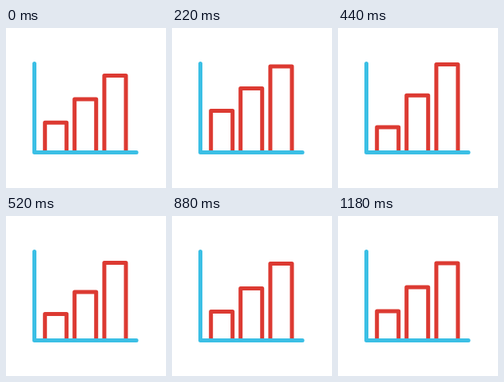
Recreate the animation shown at these times as an HTML page. Size 200x200 px, loop 1200 ms.

```html
<!DOCTYPE html>
<html lang="en">
<head>
<meta charset="utf-8">
<title>Bar chart</title>
<style>
  html, body { margin: 0; width: 100%; height: 100%; overflow: hidden; background: #fff; }
  svg { display: block; width: 100%; height: 100%; }
  path { fill: none; stroke-width: 5; stroke-linejoin: round; }
  .bar { stroke: #dc3a32; }
  .axis { stroke: #3bbfe5; stroke-linecap: round; }
</style>
</head>
<body>
<svg viewBox="0 0 200 200">
  <path class="bar"/>
  <path class="bar"/>
  <path class="bar"/>
  <path class="axis" d="M35.5 44.5V155.5H163"/>
</svg>
<script>
const LOOP = 1200, STAGGER = 67, PEAK = 223, LAND = 390, HALF_SWING = 180;
const bars = [
  { left: 48.7, right: 75.7, top: 118.5, lift: 15 },
  { left: 85.7, right: 112.7, top: 89, lift: 14 },
  { left: 122.9, right: 149.9, top: 59.5, lift: 15 }
];
const paths = document.querySelectorAll('.bar');

// Eased rise, accelerating fall, then a decaying swing around rest.
function offset(t, lift) {
  if (t <= 0) return 0;
  if (t < PEAK) return -lift * (1 - (1 - t / PEAK) ** 3);
  if (t < LAND) return -lift * (1 - ((t - PEAK) / (LAND - PEAK)) ** 4);
  const s = (t - LAND) / HALF_SWING;
  return 8.6 * Math.sin(Math.PI * s) * 0.5 ** s;
}

function draw() {
  const time = performance.now() % LOOP;
  bars.forEach(({ left, right, top, lift }, i) => {
    const y = top + offset(time - i * STAGGER, lift);
    paths[i].setAttribute('d', `M${left} 154V${y}H${right}V154`);
  });
  requestAnimationFrame(draw);
}
draw();
</script>
</body>
</html>
```
